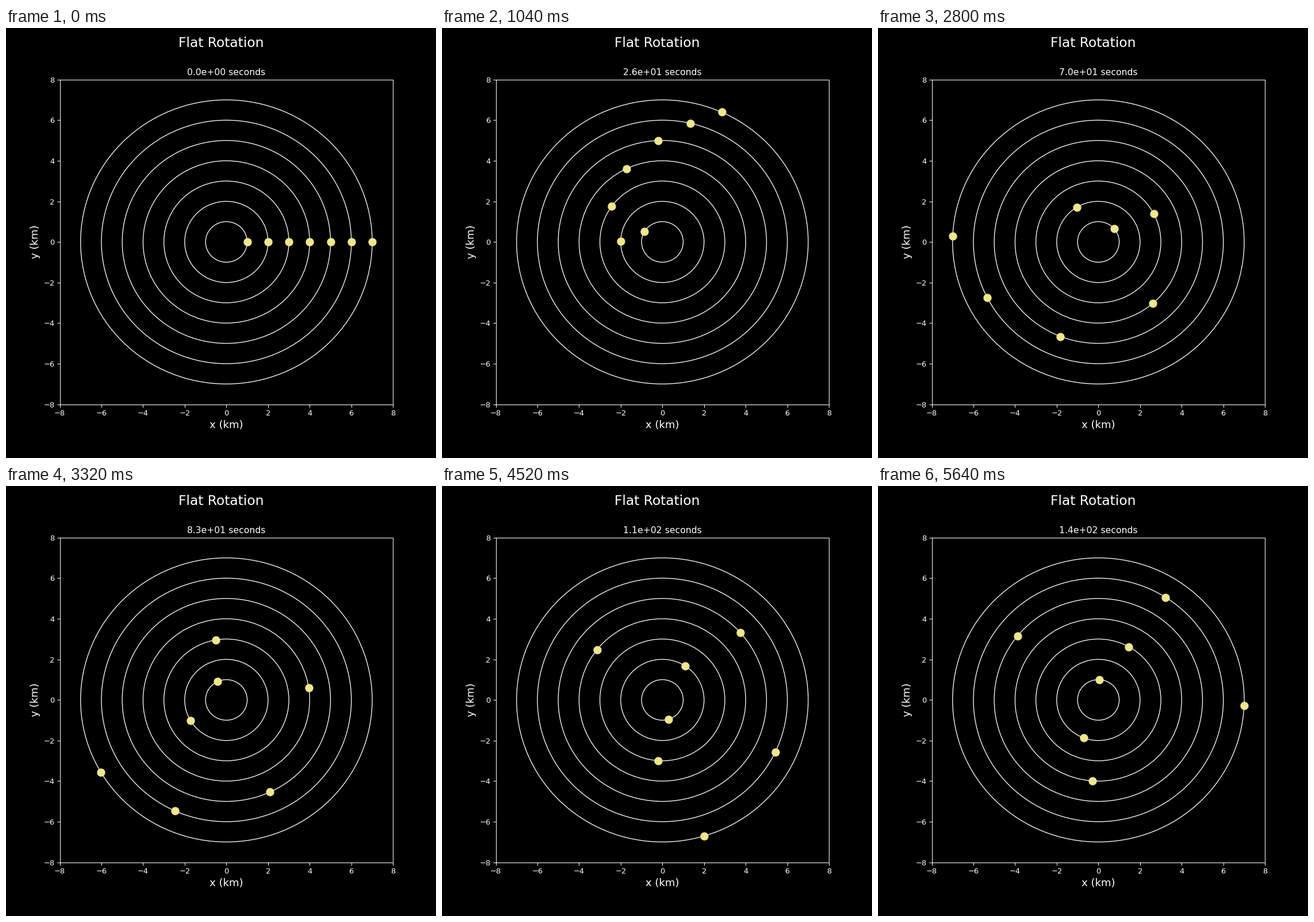
Write a matplotlib script that moves like this. It is 748 px wide and 748 px high and loops after 5.68 s.

```python
import numpy as np
import matplotlib.pyplot as plt
from matplotlib.animation import FuncAnimation

FRAMES = 142      # one frame per simulated second
INTERVAL = 40     # ms

radii = np.arange(1, 8)                                      # km
speeds = np.array([0.10, 0.24, 0.29, 0.31, 0.31, 0.31, 0.31])  # km/s
omega = speeds / radii

plt.style.use("dark_background")
plt.rcParams["font.family"] = "DejaVu Sans"

fig, ax = plt.subplots(figsize=(8, 8), dpi=93.5)
fig.subplots_adjust(left=0.125, right=0.9, bottom=0.125, top=0.88)
fig.suptitle("Flat Rotation", fontsize=18)

ax.set_xlim(-8, 8)
ax.set_ylim(-8, 8)
ax.set_xlabel("x (km)", fontsize=14)
ax.set_ylabel("y (km)", fontsize=14)
title = ax.set_title("", fontsize=12)

for r in radii:
    ax.add_patch(plt.Circle((0, 0), r, fill=False, ec="white", lw=1))

dots, = ax.plot([], [], "o", color="khaki", markersize=10, zorder=3)


def update(t):
    angle = omega * t
    dots.set_data(radii * np.cos(angle), radii * np.sin(angle))
    title.set_text(f"{t:.1e} seconds")
    return dots, title


anim = FuncAnimation(fig, update, frames=FRAMES, interval=INTERVAL,
                     repeat=True, repeat_delay=0, blit=False)

plt.show()
```
